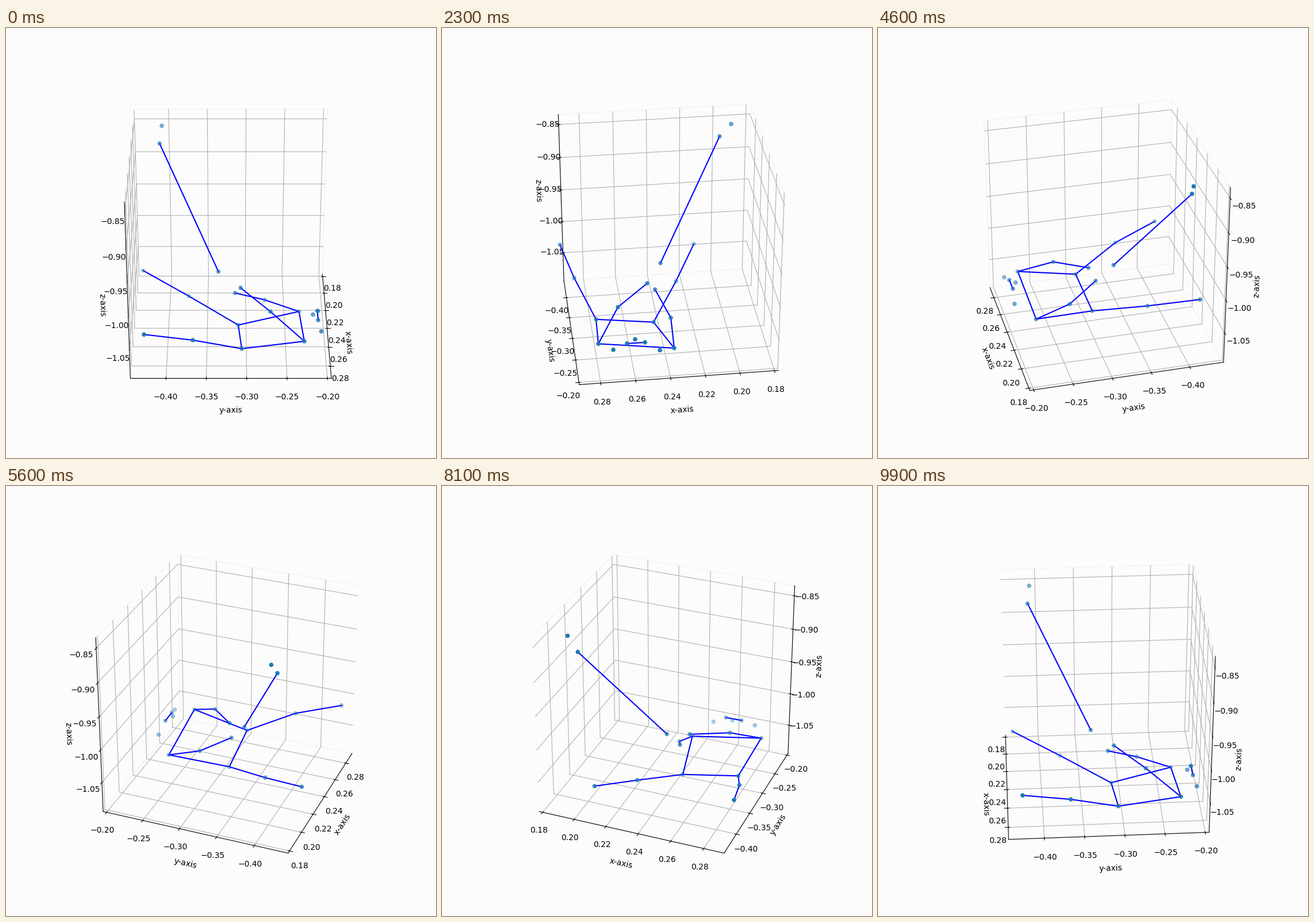
A matplotlib script for the animation above (10000 ms loop, 748x748 px).

```python
import numpy as np
import matplotlib.pyplot as plt
from matplotlib.animation import FuncAnimation

FRAMES, INTERVAL = 100, 100
PAPER, EDGE = "#fcfcfc", "#f3f3f3"

# Axis centres and spans; joints are given relative to a cube of side SIDE.
MID = np.array([0.23495, -0.31964, -0.9653])
SPAN = np.array([0.1145, 0.24908, 0.26058])
SIDE = 1.1003

JOINTS = {
    "tip": (-0.416, -0.390, 0.509),
    "rod_top": (-0.353, -0.402, 0.429),
    "rod_end": (0.0277, -0.070, -0.185),
    "ankle_l": (-0.2255, -0.508, -0.3296),
    "knee_l": (-0.084, -0.241, -0.4165),
    "hip_l": (0.0817, 0.042, -0.5068),
    "hip_r": (0.4115, 0.060, -0.450),
    "knee_r": (0.5105, -0.2065, -0.3292),
    "ankle_r": (0.5716, -0.4675, -0.253),
    "shoulder_l": (0.008, 0.389, -0.4625),
    "shoulder_r": (0.429, 0.4035, -0.390),
    "elbow_l": (0.002, 0.193, -0.388),
    "wrist_l": (0.0705, 0.024, -0.300),
    "elbow_r": (0.301, 0.2187, -0.2783),
    "wrist_r": (0.118, 0.0544, -0.2365),
    "ear_r": (0.356, 0.4993, -0.3724),
    "eye_r": (0.279, 0.4846, -0.3478),
    "nose": (0.232, 0.4575, -0.3414),
    "eye_l": (0.181, 0.484, -0.3488),
    "ear_l": (0.1005, 0.493, -0.4005),
}

CHAINS = [
    "rod_top rod_end",
    "ankle_l knee_l hip_l hip_r knee_r ankle_r",
    "hip_l shoulder_l shoulder_r hip_r",
    "shoulder_l elbow_l wrist_l",
    "shoulder_r elbow_r wrist_r",
    "eye_l eye_r",
]

points = {name: MID + SPAN * np.array(p) / SIDE for name, p in JOINTS.items()}

fig = plt.figure(figsize=(7.48, 7.48), dpi=100, facecolor=PAPER)
ax = fig.add_subplot(projection="3d", facecolor=PAPER)
ax.set_box_aspect((1, 1, 1))

low, high = MID - SPAN / 2, MID + SPAN / 2
ax.set(
    xlim=(low[0], high[0]), ylim=(low[1], high[1]), zlim=(low[2], high[2]),
    xlabel="x-axis", ylabel="y-axis", zlabel="z-axis",
)
for axis in (ax.xaxis, ax.yaxis, ax.zaxis):
    axis.pane.set(facecolor=PAPER, edgecolor=EDGE, alpha=1)

ax.scatter(*np.array(list(points.values())).T)
for chain in CHAINS:
    ax.plot(*np.array([points[name] for name in chain.split()]).T, color="blue")


def update(i):
    # A hair above zero keeps the choice of side pane stable head-on.
    ax.view_init(elev=30, azim=max(360 * i / FRAMES, 1e-6))
    return []


anim = FuncAnimation(fig, update, frames=FRAMES, interval=INTERVAL,
                     repeat=True, repeat_delay=0)
plt.show()
```
